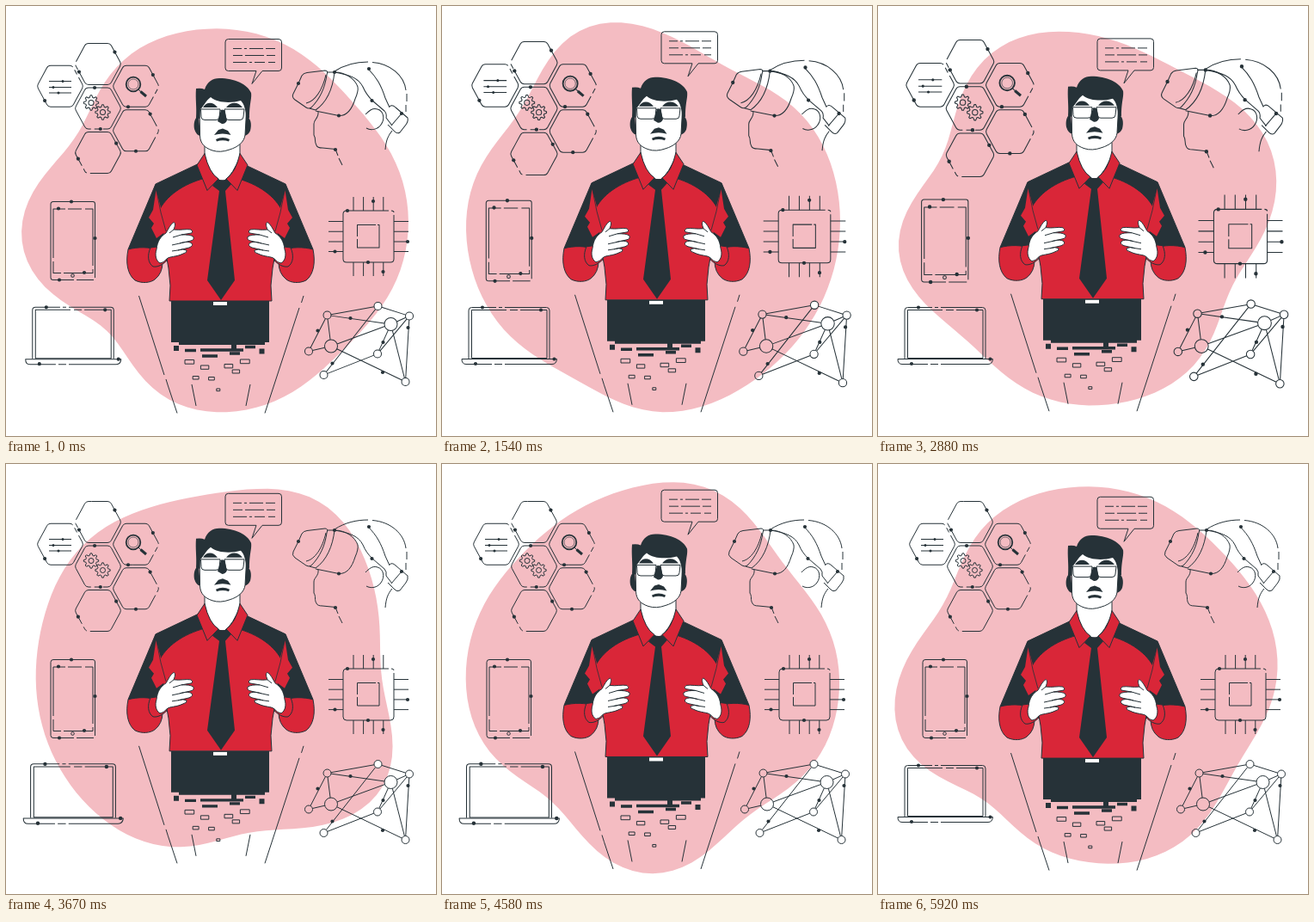
An HTML page with a canvas that plays this animation: 500 by 500 pixels, repeating every 5960 ms.

```html
<!DOCTYPE html>
<html lang="en">
<head>
<meta charset="utf-8">
<title>Hologram</title>
<style>
html, body { margin: 0; width: 100%; height: 100%; overflow: hidden; background: #fff; }
canvas { display: block; width: 500px; height: 500px; }
</style>
</head>
<body>
<canvas id="stage"></canvas>
<script>
const LOOP = 5960;
const DARK = '#263238', RED = '#d92638', PINK = '#f4bcc2', WHITE = '#fff';
const canvas = document.getElementById('stage');
const ctx = canvas.getContext('2d');
const dpr = window.devicePixelRatio || 1;
canvas.width = canvas.height = 500 * dpr;

// ---------- helpers ----------
const cache = {};
const path = d => cache[d] || (cache[d] = new Path2D(d));
const mix = (a, b, u) => a + (b - a) * u;

function shape(d, fill, stroke, width = 1, dash = []) {
  const p = typeof d === 'string' ? path(d) : d;
  if (fill) { ctx.fillStyle = fill; ctx.fill(p); }
  if (stroke) {
    ctx.strokeStyle = stroke;
    ctx.lineWidth = width;
    ctx.setLineDash(dash);
    ctx.stroke(p);
    ctx.setLineDash([]);
  }
}
const line = (d, width = 1, dash) => shape(d, null, DARK, width, dash);

function circle(x, y, r, fill, stroke, width) {
  const p = new Path2D();
  p.arc(x, y, r, 0, Math.PI * 2);
  shape(p, fill, stroke, width);
}
// each dot is a zero-length stroke with round caps
function dots(d, size = 4.2) {
  ctx.lineCap = 'round';
  line(d, size);
  ctx.lineCap = 'butt';
}
function box(x, y, w, h) {
  const p = new Path2D();
  p.rect(x, y, w, h);
  shape(p, null, DARK);
}
function scaled(cx, cy, s, draw) {
  ctx.save();
  ctx.translate(cx, cy);
  ctx.scale(s, s);
  ctx.translate(-cx, -cy);
  draw();
  ctx.restore();
}
function bothSides(draw, axis = 249.5) {
  draw();
  ctx.save();
  ctx.translate(axis * 2, 0);
  ctx.scale(-1, 1);
  draw();
  ctx.restore();
}

// ---------- motion ----------
// two linear beats per loop
function pulse(p) {
  p %= 1;
  const ramp = (from, top, to) =>
    Math.max(0, Math.min((p - from) / (top - from), (to - p) / (to - top)));
  return 1 + .1 * (ramp(0, .1, .32) + ramp(.43, .53, .615));
}
const swing = p => 1 - Math.abs(1 - 2 * (p % 1));
const hover = p => -9.2 * (1 - (1 - swing(p * 4)) ** 2);
const drift = p => -9 * swing(p * 2);

// ---------- blob: a circle with bumps and dents [angle, height] ----------
const blobs = [
  { t: 0, r: 224, bumps: [[45, -14], [135, -44], [175, 10], [211, -34], [318, -14]] },
  { t: 790, r: 208, bumps: [[45, 18], [88, -12], [114, 18], [165, -14], [213, 24], [258, -14], [293, 16]] },
  { t: 1540, r: 218, bumps: [[88, 8], [116, -15], [222, -24], [248, 26], [297, -20]] },
  { t: 2880, r: 215, bumps: [[25, -32], [135, -18], [172, 16], [203, -32], [245, 14], [300, -12], [337, 14]] },
  { t: 3670, r: 210, bumps: [[0, -22], [32, 24], [78, -28], [225, 10], [300, 28]] },
  { t: 4580, r: 218, bumps: [[56, -26], [88, 14], [130, -34], [225, -8], [287, 16], [318, -18]] },
  { t: 5920, r: 224, bumps: [[30, -24], [98, -10], [132, -40], [158, 14], [208, -34], [316, -10]] }
];
function radius(blob, deg) {
  return blob.bumps.reduce((r, [at, height]) => {
    const d = (deg - at + 540) % 360 - 180;
    return r + height * Math.exp(-((d / 17) ** 2) / 2);
  }, blob.r);
}
function drawBlob(t) {
  const last = blobs.length - 1;
  const next = Math.max(1, blobs.findIndex((b, i) => b.t > t || i === last));
  const a = blobs[next - 1], b = blobs[next];
  const u = Math.min(1, (t - a.t) / (b.t - a.t));
  const p = new Path2D();
  for (let deg = 0; deg < 360; deg += 3) {
    const r = mix(radius(a, deg), radius(b, deg), u), th = deg * Math.PI / 180;
    p.lineTo(245 + r * Math.cos(th), 250 + r * Math.sin(th));
  }
  p.closePath();
  shape(p, PINK);
}

// ---------- icons ----------
const corners = [[-27, 0], [-14, -24], [14, -24], [27, 0], [14, 24], [-14, 24]];
// marks: edge number plus the fraction along that edge
function hexagon(x, y, shift, marks) {
  const p = new Path2D();
  p.moveTo(x, y - 24);
  for (let i = 2; i < 8; i++) {
    const a = corners[i % 6], b = corners[(i + 1) % 6];
    p.arcTo(x + a[0], y + a[1], x + b[0], y + b[1], 5);
  }
  p.closePath();
  ctx.lineDashOffset = shift;
  line(p, 1, [110, 4, 6, 4, 30, 0]);
  ctx.lineDashOffset = 0;
  for (const m of marks) {
    const a = corners[Math.floor(m)], b = corners[Math.floor(m + 1) % 6];
    circle(x + mix(a[0], b[0], m % 1), y + mix(a[1], b[1], m % 1), 2.1, DARK);
  }
}
function gear(x, y) {
  const p = new Path2D();
  for (let i = 0; i < 32; i++) {
    const a = (i - .5) * Math.PI / 16, r = i % 4 < 2 ? 8.7 : 6.3;
    p.lineTo(x + r * Math.cos(a), y + r * Math.sin(a));
  }
  p.closePath();
  line(p);
  circle(x, y, 3, null, DARK);
}
function hexagons() {
  const cell = (col, row, shift, ...marks) => hexagon(107 + 44 * col, 119 + 51.5 * row, shift, marks);
  cell(-1, -.5, 95, 5.3);
  cell(0, -1, 0, 2.42, 5.62);
  cell(1, -.5, 70, 2.45, 4.82);
  cell(0, 0, 35, 1.36, 4.4);
  cell(1, .5, 75, 2.2, 4.5);
  cell(0, 1, 20, 2.55, 5.7);
  line('M50 87.5h26m-26 7h26m-26 6.5h26');
  dots('M66 87.5h0M55 94.5h0M61 101h0', 3);
  circle(148, 91, 8.3, null, DARK, 1.8);
  circle(148, 91, 6, null, DARK, .6);
  line('M154 97l3 3');
  line('M156.5 99.5l6.5 5.5', 3);
  gear(99, 112.5);
  gear(112.5, 123.5);
}
function phone() {
  line('M103.5 316V230Q103.5 227.5 101 227.5H55Q52 227.5 52 230.5V315.5Q52 318.5 55 318.5H79m3 0h20');
  line('M55 293V236h14m3 0h16m4 0h9v66m0 4v4.5H67m-3 0h-9V297');
  circle(77.5, 313.5, 1.8, null, DARK);
  dots('M76 227.5h0M61 235.5h0M103.5 270h0M91 310h0M62 318.5h0');
}
function laptop() {
  line('M31 410V354Q31 350.5 34.5 350.5H63m3 0h4m3 0h48.5Q125 350.5 125 354V410');
  line('M75 353.5H34.5v56H122v-56H91m-3 0h-9');
  line('M58 416.5H28Q23 416.5 23 410.5H133.5Q133 416.5 128 416.5H73m-3 0h-9');
  dots('M47 350.5h0M115 353.5h0M130.5 410.5h0M39 416h0');
}
function chip() {
  line('M451 243V294Q451 298 447 298H396Q392 298 392 294V242Q392 238 396 238H445m3 0Q451 238 451 240');
  line('M430 254.5H408.5V268m0 3v10H434V254.5h-2');
  for (let i = 0; i < 4; i++) {
    const x = 404 + i * 11.6, y = 250.5 + i * 11.7;
    line(`M${x} 222v16m0 60v16M375 ${y}h17m59 0h17`);
  }
  dots('M397 238h0M427 227h0M467 274h0M382.5 285.5h0M421 298h0M438.5 309h0');
}
function headset() {
  line('M340 90L344 81Q346 78 350 77.5L371 75Q375 75 373 80C371 95 365 108 355 118Q352 120 349 118L336 109Q332 106 334 102Z');
  line('M349 113C359 111 368 98 372 80M373 77H382C380 95 373 112 360 121L353 119');
  line('M382 77C395 77 406 85 409 94Q410 99 406 108C402 121 396 128 387 127.5L360 122');
  line('M382 76C394 68 408 65 421 65m5 .5C447 67 463 81 465 98m1 4v9m-1 4v8');
  line('M382 77C400 80 410 84 415 94C418 101 421 105 426 110L440 122Q443 125 442 130L449 139');
  line('M421 73C431 83 436 92 441 107L446 118');
  line('M446 117Q449 114 453 118L467 130Q468 134 465 138L458 147Q455 149 452 146L444 138');
  line('M460 125L448 139M419 142C424 145 432 144 436 138C441 131 439 122 432 120C426 118 422 122 418 126');
  line('M449 145C444 151 442 156 441 167');
  line('M363 123C364 130 358 132 358 137V150C361 155 358 157 361 162Q362 165 368 165L383 166.5l3 7.5m1 3l4 8');
  dots('M382 77h0M422 73h0M340 90h0M425.500 110h0M387 127.5h0M383 167h0M460 125h0');
}
const nodes = {
  a: [432.5, 349], b: [373.5, 359.5], c: [469, 360.5], d: [447.5, 370], e: [378, 395.5],
  f: [352, 401.5], g: [432, 404.5], h: [369.5, 429], i: [464.5, 437]
};
const edges = 'ab ac ah bd be bf cd ci cg dg de di ef ei hg'.split(' ');
function network() {
  const size = k => 'de'.includes(k) ? 7.5 : 4.5;
  const p = new Path2D();
  for (const [m, n] of edges) {
    const [x, y] = nodes[m], [X, Y] = nodes[n];
    const l = Math.hypot(X - x, Y - y), from = size(m) / l, to = 1 - size(n) / l;
    p.moveTo(mix(x, X, from), mix(y, Y, from));
    p.lineTo(mix(x, X, to), mix(y, Y, to));
  }
  line(p);
  for (const k in nodes) circle(...nodes[k], size(k), 'befh'.includes(k) ? null : WHITE, DARK);
  dots('M400.5 363h0M467.5 374h0M362.5 377.5h0M438.5 391h0M379.5 415.5h0M438 426h0');
}
function bubble() {
  line('M291 75.5H258.5Q255 75.5 255 72V42Q255 38.5 258.5 38.5H317Q320.5 38.5 320.5 42V72Q320.5 75.5 317 75.5H298L286 90.5Z');
  line('M264 49.5h10m3 0h3m3 0h16m3 0h11M264 57.5h11m3 0h22m3 0h10M264 65.5h16m3 0h3m3 0h12m4 0h8');
}

// ---------- figure ----------
function beams() {
  line('M154.5 337L184 429m2 5l2.5 8L199 473.5');
  line('M346 337l-2.5 8M341 351L301 473.5');
  line('M216 440l5 25M284 440l-5 25');
}
function pixels() {
  shape('M192 343h114v48h-5v3h-100v-3h-9ZM262 393h6v8h-6Z', DARK);
  shape('M241 344h16v4h-16Z', WHITE);
  line('M208 400.5h13m5-.5h50M228 407h18M260 404h12M278 396.5h12', 3.4);
  line('M195 398h6M294.5 401.500h6', 6);
  // lower pieces get smaller
  [411.5, 430.5, 418, 431.5, 445, 416.5, 423, 411].forEach((y, i) => {
    const w = 4 + (445 - y) * .2;
    box(208 + 9.2 * i, y, w, 1.5 + w * .3);
  });
}
function sleeve() {
  shape('M231 180L174 207L142 283C150 289 170 288 178 284L190 250L236 200Z', DARK, DARK);
  shape('M142 283C139 298 141 312 150 319C158 323 168 322 173 318Q182 311 182 298L176 284C168 280 153 280 142 283Z', RED, DARK);
}
function flame() {
  shape('M174.5 214L171 237L166 246L172 253L169 258L175 270L186 262L181 238Z', RED);
  line('M173.5 208L180 240L186 262', .8);
}
function hand() {
  shape('M176 280L168 281C164 290 165 299 171 303C176 304 182 301 187 296Z', RED, DARK);
  shape('M179 299C174 296 173 289 175 283C176 273 180 268 186 264C189 259 191 254 195 251.5C197 252 197 255 195 260' +
    'C203 261 209 259 215 260Q218 262 216 264L204 266C210 266 215 266 218 268.5Q219 272 215 273L202 276' +
    'C208 274 213 274 216 276Q218 279 213 281L200 284Q206 282 210 284Q211 287 206 288C198 292 190 291 187 294Q183 299 179 299Z', WHITE, DARK);
  line('M204 266l-10 3M202 276l-9 2M200 284l-7 1M195 260l-5 4');
}
function collar() {
  shape('M231 171.5L222 185L234 214.5L247 201Q236 194 231 171.5Z', RED, DARK);
}
function torso() {
  bothSides(sleeve);
  shape('M236 199C210 205 189 218 179 236L186 288L189 305L191 325L190 343H309L308 325L310 305L313 288L320 236C310 218 289 205 263 199Z', RED, DARK);
  bothSides(flame);
  shape('M231 160V174Q237 197 249 203H254Q264 196 272 175V160Z', WHITE, DARK);
  shape('M240 209L246 201Q252 204 258 201L263 206L255 215L266 319L250 342L234 319L248 215Z', DARK);
  bothSides(collar, 251.5);
  bothSides(hand);
}
function head() {
  shape('M224 128C219 130 218 137 219 143Q221 150 226 151ZM278 128C285 129 286 138 284 145Q282 150 277 151Z', DARK);
  shape('M225 112L225.5 151C226 160 231 165 240 168Q249 171 260 167C270 164 277 158 278 150L280 115L270 103H233Z', WHITE, DARK);
  shape('M221 96Q227 95 231 97C234 88 240 84 248 84C266 84 281 91 285 101C286 108 283 113 283 130L279 132C279 121 277 114 273 110C262 113 246 113 238 106C232 110 230 117 226 120L225 131L221 130C222 118 220 108 221 96Z', DARK);
  shape('M229 118C233 111 241 111 246 118ZM256 118C261 111 270 111 275 118Z', DARK);
  shape('M226.5 120H249L248 130Q247 132.5 244 132.5H231Q227 132.5 227 129ZM254 120H277L276 129Q276 132.5 272 132.5H259Q256 132.5 255.5 130Z', WHITE, DARK);
  line('M249 122Q251.5 120 254 122');
  shape('M250 121H254L257 133Q255 137.5 251 137L246 134Z', DARK);
  shape('M242 150L247 144L252 142.5L258 145L261.5 150Q252 147 242 150ZM244 155Q252 151 260 155L259 157.5Q252 155 245 157.5Z', DARK);
}

// ---------- frame ----------
function draw(t) {
  const p = t / LOOP, s = pulse(p);
  ctx.setTransform(dpr, 0, 0, dpr, 0, 0);
  ctx.fillStyle = WHITE;
  ctx.fillRect(0, 0, 500, 500);
  drawBlob(t);
  scaled(107, 119, s, hexagons);
  scaled(78, 272.5, s, phone);
  scaled(421.5, 268, s, chip);
  scaled(404, 126, s, headset);
  scaled(411, 394, s, network);
  scaled(78, 383, pulse(p + .435), laptop);
  ctx.save();
  ctx.translate(0, drift(p));
  bubble();
  ctx.restore();
  ctx.translate(0, hover(p));
  beams();
  pixels();
  torso();
  head();
}
ctx.lineJoin = 'round';
const start = performance.now();
function tick() {
  draw((performance.now() - start) % LOOP);
  requestAnimationFrame(tick);
}
tick();
</script>
</body>
</html>
```
